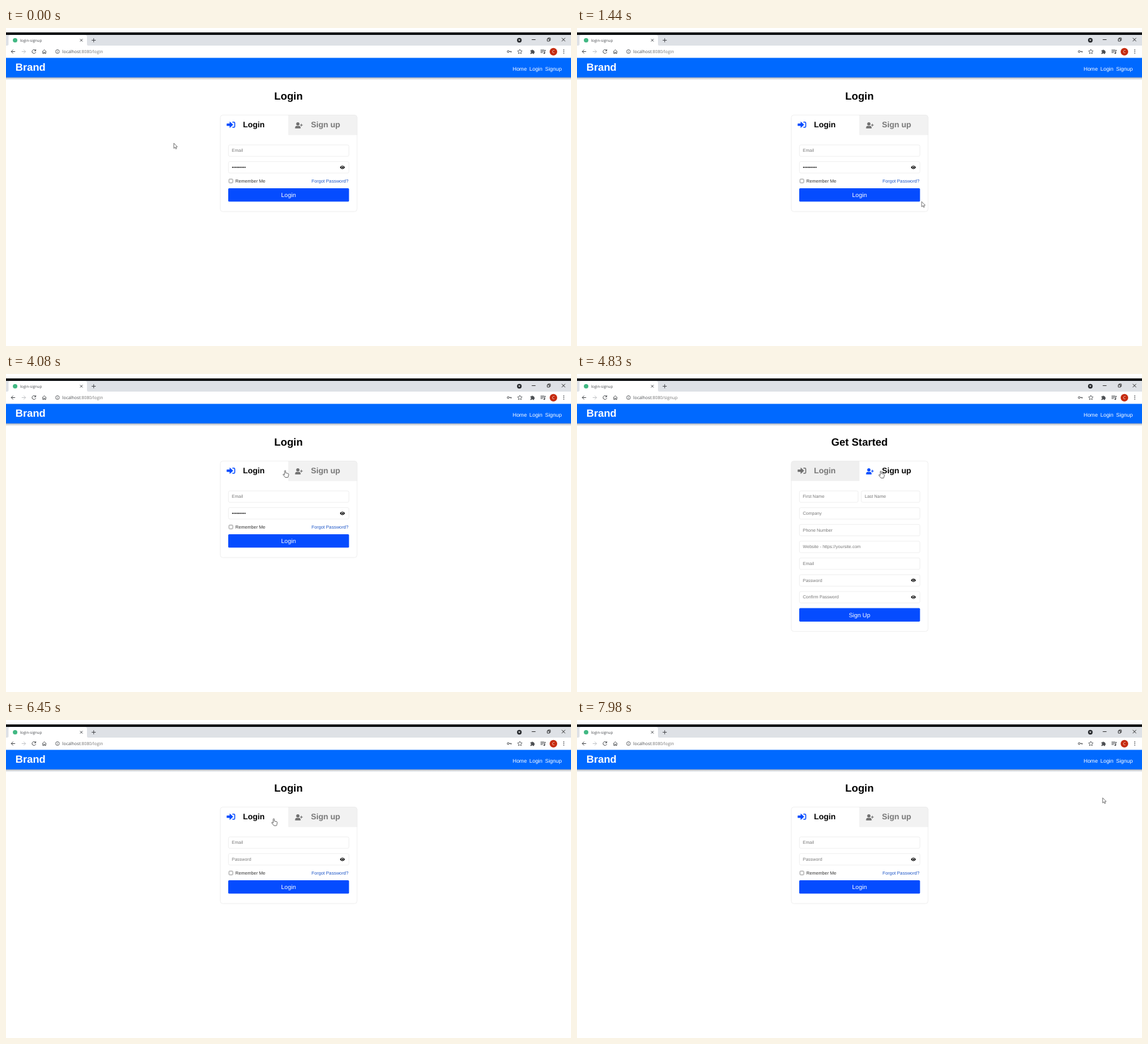
An HTML page for the animation above (8000 ms loop, 900 by 506 pixels).

```html
<!DOCTYPE html>
<html lang="en">
<head>
<meta charset="utf-8">
<title>Login and signup</title>
<style>
html, body { margin: 0; width: 100%; height: 100%; overflow: hidden; background: #fff; }
svg { display: block; width: 900px; height: 506px; font: 7px "Liberation Sans", Arial, sans-serif; text-rendering: geometricPrecision; }
.chrome { font-family: "Open Sans", "Noto Sans", sans-serif; fill: #4a4d51; }
.line { fill: none; stroke: #4a4d51; stroke-width: 1; }
.bold { font-weight: bold; }
.mid { text-anchor: middle; }
.box { fill: #fff; stroke: #ebebeb; stroke-width: .8; }
.hint { fill: #777; }
</style>
</head>
<body>
<svg viewBox="0 0 900 506">
  <defs>
    <linearGradient id="shade" x2="0" y2="1">
      <stop stop-color="#8294ad"/><stop offset=".4" stop-color="#ccd0d6"/><stop offset="1" stop-color="#fff"/>
    </linearGradient>
    <g id="enter">
      <path d="M352 152h4.2v-2.6q0-.8.7-.2l4.6 4.3q.4.4 0 .8l-4.6 4.3q-.7.6-.7-.2v-2.6h-4.2q-.5 0-.5-.5v-2.8q0-.5.5-.5z"/>
      <path d="M360.6 149.7h2.2q1.6 0 1.6 1.6v5.2q0 1.6-1.6 1.6h-2.2" fill="none" stroke="currentColor" stroke-width="1.5"/>
    </g>
    <g id="person">
      <circle cx="464.9" cy="152.5" r="2.6"/>
      <path d="M460.5 159.7v-1q0-2.9 2.9-2.9h3q2.9 0 2.9 2.9v1z"/>
      <path d="M468.4 154.5h4.2m-2.1-2.1v4.2" stroke="currentColor" stroke-width="1.2"/>
    </g>
    <g id="eye">
      <path d="M-4 0Q-2.4-2.8 0-2.8T4 0Q2.4 2.8 0 2.8T-4 0z"/>
      <circle r="1.9" fill="#fff"/><circle r="1.3"/><circle cx="-.6" cy="-.6" r=".5" fill="#fff"/>
    </g>
    <path id="arrow" d="M.3.3v8.2l1.9-1.7 1.3 2.7 1.3-.6-1.2-2.6 2.4-.2z" fill="#fff" stroke="#555" stroke-width=".8"/>
    <path id="hand" d="M-.9 1Q0-.4.9 1v3.4l3.6.8q1.2.4 1.1 1.6l-.6 3.2-.7 1.6H.3L-3.2 7.3q-.3-1.3 1-.9l1.3 1z" fill="#fff" stroke="#444" stroke-width=".8"/>
    <path id="beam" d="M-1.6-4.5q1.6 0 1.6 1v7q0 1-1.6 1m3.2-9q-1.6 0-1.6 1v7q0 1 1.6 1" fill="none" stroke="#555" stroke-width=".7"/>
  </defs>
  <rect width="900" height="506" fill="#fff"/>

  <g class="chrome">
    <path d="M0 7h900v4H0z" fill="#070a0d"/>
    <path d="M0 11h900v17H0z" fill="#dee1e6"/>
    <path d="M2 28q2 0 2-2V14q0-3 3-3h119q3 0 3 3v12q0 2 2 2z" fill="#fff"/>
    <circle cx="14.5" cy="19.5" r="3.6" fill="#41b883"/>
    <text x="22.5" y="21.7" font-size="6.1">login-signup</text>
    <text id="url" x="89.8" y="40.2" font-size="6.9"></text>
    <g class="line">
      <path d="M118 17.5l4 4m0-4l-4 4M136.5 19.5h6.4m-3.2-3.2v6.4"/>
      <path d="M14.5 37.5H8.3m3-3l-3 3 3 3"/>
      <path d="M25 37.5h6.2m-3-3l3 3-3 3" stroke="#c3c5c8"/>
      <path d="M47 35.7a3 3 0 1 0 .4 2.7M47.4 34v2.3h-2.3"/>
      <path d="M57.6 37.8l3.4-3.2 3.4 3.2m-5.7-.6v3.5h1.5v-2h1.6v2h1.5v-3.5" stroke-width=".9"/>
      <circle cx="82" cy="37.5" r="3" stroke-width=".8"/><path d="M82 37.2v2m0-3.6v.8" stroke-width=".8"/>
      <circle cx="799.9" cy="37.5" r="1.5"/><path d="M801.4 37.3h4m-1 0v1.8"/>
      <path d="M818.5 33.8l1.1 2.4 2.6.3-1.9 1.8.5 2.6-2.3-1.3-2.3 1.3.5-2.6-1.9-1.8 2.6-.3z" stroke-width=".8"/>
      <path d="M851.5 35h6m-6 2h6m-6 2h3.5m3.2 1v-4.5h1.6"/>
      <path d="M837.5 18.5h6M862.2 17.3h3.6v3.6h-3.6zm1.2-.1v-1.3h3.6v3.8h-1.2M885.3 15.8l5.4 5.4m0-5.4l-5.4 5.4" stroke="#222" stroke-width=".9"/>
    </g>
    <circle cx="857.4" cy="40" r="1.2"/>
    <path d="M835.4 35.5h1.8a1.1 1.1 0 0 1 2.2 0h1.8v1.8a1.1 1.1 0 0 1 0 2.2v1.8h-1.8a1.1 1.1 0 0 0-2.2 0h-1.8v-1.8a1.1 1.1 0 0 0 0-2.2z"/>
    <circle cx="817.7" cy="19.5" r="3.7" fill="#292c30"/><path d="M816 18.5h3.4l-1.7 2.2z" fill="#fff"/>
    <circle cx="872" cy="37.7" r="6" fill="#c52b10"/><text class="mid" x="872" y="40" font-size="6.4" fill="#fff">C</text>
    <circle cx="888.5" cy="34.9" r=".8"/><circle cx="888.5" cy="37.6" r=".8"/><circle cx="888.5" cy="40.3" r=".8"/>
  </g>

  <path d="M0 78h900v5H0z" fill="url(#shade)"/>
  <path d="M0 47.5h900v31H0z" fill="#0069ff"/>
  <g fill="#fff">
    <text class="bold" x="15" y="67.8" font-size="16.6">Brand</text>
    <g font-size="8.5"><text x="807" y="67.6">Home</text><text x="833.7" y="67.6">Login</text><text x="858.8" y="67.6">Signup</text></g>
  </g>

  <g id="login"></g>
  <g id="signup"></g>
  <use id="cursor"/>
</svg>
<script>
const $ = id => document.getElementById(id);
const BLUE = '#054cff';

const field = (hint, y, x = 354.4, w = 191.8) =>
  `<rect class="box" x="${x}" y="${y - 9}" width="${w}" height="18.2" rx="2.2"/>
   <text class="hint" x="${x + 5.4}" y="${y + 2.4}">${hint}</text>`;
const eye = y => `<use href="#eye" x="535.9" y="${y}"/>`;
const button = (label, y) =>
  `<rect x="354" y="${y}" width="192.4" height="21.3" rx="1.6" fill="${BLUE}"/>
   <text class="mid" x="450" y="${y + 13.9}" font-size="9.6" fill="#fff">${label}</text>`;

function tab(icon, label, x, active) {
  const color = active ? BLUE : '#707070';
  return `<use href="#${icon}" fill="${color}" color="${color}"/>
    <text class="bold" x="${x}" y="158.4" font-size="12.7" fill="${active ? '#000' : '#777'}">${label}</text>`;
}

function card(title, height, loginActive) {
  const idle = loginActive ? 'M450 138.6h105.2q4 0 4 4v27.2H450z' : 'M449.5 138.6H345.3q-4 0-4 4v27.2h108.2z';
  return `<text class="bold mid" x="450" y="114.2" font-size="16.7">${title}</text>
    <rect class="box" x="341.3" y="138.6" width="217.9" height="${height}" rx="4"/>
    <path d="${idle}" fill="${loginActive ? '#f2f2f2' : '#efefef'}" stroke="#e8e8e8" stroke-width=".5"/>
    ${tab('enter', 'Login', 377.6, loginActive)}${tab('person', 'Sign up', 485.7, !loginActive)}`;
}

$('login').innerHTML = card('Login', 153.5, true) + field('Email', 195) + field('', 221.6) +
  `<text id="password" x="359.8" y="224"></text>${eye(221.7)}
   <path id="slash" d="M532.4 218.8l7 5.8" stroke="#000" stroke-width="1"/>
   <rect x="355.2" y="240.4" width="6" height="6" rx="1" fill="#fff" stroke="#777" stroke-width=".8"/>
   <text x="365.2" y="245.7" font-size="7.25" fill="#333">Remember Me</text>
   <text x="486.8" y="245.7" font-size="7.25" fill="#2058c8">Forgot Password?</text>` + button('Login', 255);

const rows = ['Company', 'Phone Number', 'Website - https://yoursite.com', 'Email', 'Password', 'Confirm Password'];
$('signup').innerHTML = card('Get Started', 271, false) +
  field('First Name', 195, 354.4, 93.4) + field('Last Name', 195, 452.9, 93.3) +
  rows.map((hint, i) => field(hint, 221.7 + i * 26.67)).join('') +
  eye(328.3) + eye(355) + button('Sign Up', 372.6);

// Pointer path: time, x, y
const path = [
  [0, 267, 183], [30, 267, 183], [420, 330, 189], [840, 386, 200], [990, 401.5, 211.5],
  [1250, 460, 250], [1430, 545, 276], [1600, 579, 272], [1900, 525, 266], [2150, 528, 240],
  [2370, 533.7, 222.5], [3870, 533.7, 222.5], [4080, 445, 153.2], [4290, 377, 152],
  [4650, 484, 154], [4830, 484, 154], [5250, 462, 165], [5640, 426.5, 156.5],
  [6720, 426.5, 156.5], [6900, 461, 326.5], [7200, 620, 298], [7520, 770, 200], [7980, 837, 123.5], [8000, 837, 123.5]
];

function slope(i, k) {
  const a = path[i - 1], b = path[i], c = path[i + 1];
  if (!a || !c || (b[k] - a[k]) * (c[k] - b[k]) <= 0) return 0;
  return (c[k] - a[k]) / (c[0] - a[0]);
}

// Hermite curve that stops at holds and turning points
function pointer(t, k) {
  const i = path.findIndex(p => p[0] > t) - 1;
  const a = path[i], b = path[i + 1], d = b[0] - a[0], u = (t - a[0]) / d, v = 1 - u;
  return v * v * ((1 + 2 * u) * a[k] + u * d * slope(i, k)) +
    u * u * ((1 + 2 * v) * b[k] - v * d * slope(i + 1, k));
}

function shape(x, y, signup) {
  const inside = (l, t, r, b) => x > l && x < r && y > t && y < b;
  if (inside(341, 139, 559, 170) || (!signup && inside(354, 255, 546, 276))) return 'hand';
  if (inside(354, 186, 546, 204) || inside(354, 213, 528, 231)) return 'beam';
  return 'arrow';
}

function draw(t) {
  const signup = t >= 4830 && t < 5910, shown = t >= 2790 && t < 3660, empty = t >= 5910;
  $('login').style.display = signup ? 'none' : '';
  $('signup').style.display = signup ? '' : 'none';
  $('url').innerHTML = `localhost<tspan fill="#777">:8080/${signup ? 'signup' : 'login'}</tspan>`;
  $('password').textContent = empty ? 'Password' : shown ? 'test12345' : '•'.repeat(9);
  $('password').setAttribute('fill', empty ? '#777' : '#111');
  $('slash').style.display = shown ? '' : 'none';
  const x = pointer(t, 1), y = pointer(t, 2);
  $('cursor').setAttribute('href', '#' + shape(x, y, signup));
  $('cursor').setAttribute('transform', `translate(${x} ${y})`);
}

const start = performance.now();
function frame() {
  draw((performance.now() - start) % 8000);
  requestAnimationFrame(frame);
}
frame();
</script>
</body>
</html>
```
